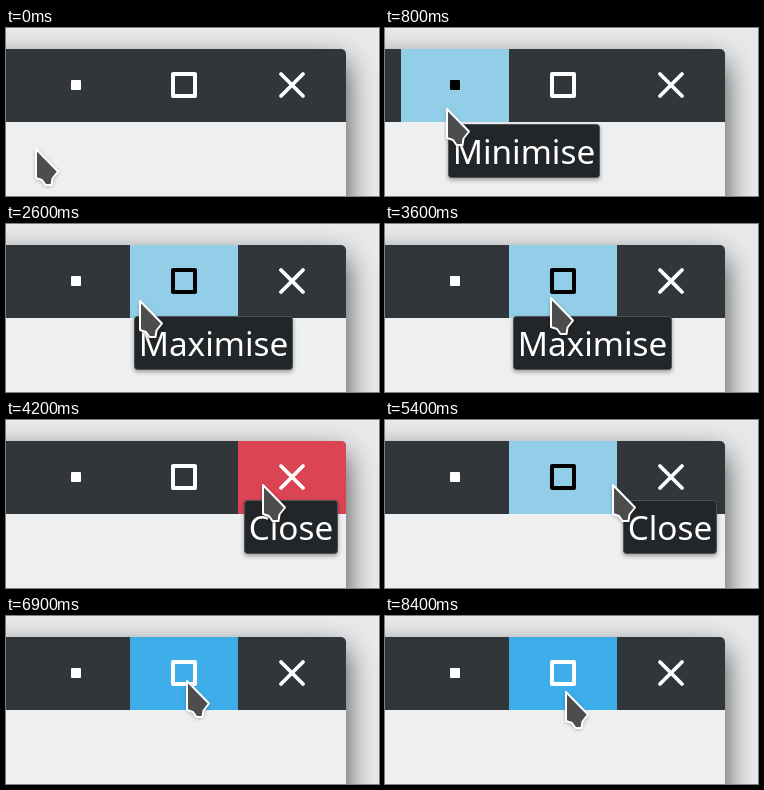
An HTML page for the animation above (8.6 s loop, 373 by 168 pixels).

```html
<!DOCTYPE html>
<html lang="en">
<head>
<meta charset="utf-8">
<title>Window buttons</title>
<style>
  html, body { margin: 0; width: 100%; height: 100%; overflow: hidden; background: #e8e9ea; }
  svg { display: block; width: 373px; height: 168px; }
  text { font: 33.33px "Noto Sans", sans-serif; fill: #fff; }
</style>
</head>
<body>
<svg viewBox="0 0 373 168">
  <defs>
    <filter id="soft" filterUnits="userSpaceOnUse" x="-160" y="-60" width="620" height="500">
      <feGaussianBlur stdDeviation="15"/>
    </filter>
    <filter id="near" x="-20%" y="-30%" width="140%" height="160%">
      <feGaussianBlur stdDeviation="2"/>
    </filter>
    <clipPath id="frame"><rect x="-40" y="21" width="380" height="300" rx="5"/></clipPath>
  </defs>
  <rect width="373" height="168" fill="#e8e9ea"/>
  <rect x="-100" y="34" width="440" height="300" rx="5" fill="#000" opacity=".72" filter="url(#soft)"/>
  <g clip-path="url(#frame)">
    <rect x="-40" y="21" width="380" height="300" fill="#eeeff0"/>
    <rect x="-40" y="21" width="380" height="73" fill="#31363b"/>
    <rect id="hover" y="21" width="108" height="73"/>
  </g>
  <rect id="min" x="65" y="52" width="10" height="10" rx="1"/>
  <rect id="max" x="167" y="46" width="22" height="22" fill="none" stroke-width="4" stroke-linejoin="round"/>
  <path d="M275 46l22 22m0-22l-22 22" stroke="#fff" stroke-width="3.8" stroke-linecap="round"/>
  <g id="tip">
    <rect id="tipShadow" y="2" height="54" rx="3" opacity=".35" filter="url(#near)"/>
    <rect id="tipBox" x=".5" y=".5" height="53" rx="3" fill="#232629" stroke="#515456"/>
    <text id="tipText" x="4.7" y="39.7"></text>
  </g>
  <g id="cursor" stroke-linejoin="round">
    <path d="M1 2V31L7 33L10.5 38H16.5L17.5 31.5L23 24.5Z" transform="translate(0 1)" opacity=".4" filter="url(#near)"/>
    <path d="M1 2V31L7 33L10.5 38H16.5L17.5 31.5L23 24.5Z" fill="#4d4d4d" stroke="#fff" stroke-width="2"/>
  </g>
</svg>
<script>
const LOOP = 8600, STEP = 100, PRESS = 6900;
const BUTTON_X = 16, BUTTON_W = 108, BAR_BOTTOM = 94;

// time, x, y of the pointer's hot spot
const path = [
  [100, 29, 119], [200, 32, 115], [500, 58, 83], [600, 61, 79],
  [1800, 61, 79], [1900, 67, 79], [2100, 88, 79], [2700, 142, 74], [3000, 160, 72],
  [3200, 165, 72], [3600, 165, 72], [4200, 256, 63],
  [5100, 256, 63], [5200, 250, 63], [5400, 227, 63], [5900, 180, 63],
  [8200, 180, 63], [8400, 180, 74]
];
const tips = [
  { from: 800, to: 2500, x: 63, y: 96, w: 152, label: "Minimise" },
  { from: 2500, to: 4100, x: 128, y: 92, w: 159, label: "Maximise" },
  { from: 4100, to: 5500, x: 238, y: 80, w: 94, label: "Close" }
];

const $ = id => document.getElementById(id);
const set = (id, attrs) => {
  for (const name in attrs) $(id).setAttribute(name, attrs[name]);
};

function pointerAt(t) {
  const i = path.findIndex(key => key[0] > t);
  if (i === 0) return path[0].slice(1);
  if (i < 0) return path[path.length - 1].slice(1);
  const [t0, x0, y0] = path[i - 1], [t1, x1, y1] = path[i];
  const k = (t - t0) / (t1 - t0);
  return [x0 + (x1 - x0) * k, y0 + (y1 - y0) * k];
}

function draw(time) {
  const t = Math.floor((time % LOOP) / STEP) * STEP;
  const [x, y] = pointerAt(t);
  const pressed = t >= PRESS;
  const button = y < BAR_BOTTOM ? Math.floor((x - BUTTON_X) / BUTTON_W) : -1;
  const ink = index => button === index && !pressed ? "#000" : "#fff";

  set("hover", {
    x: BUTTON_X + button * BUTTON_W,
    fill: button < 0 ? "none" : button === 2 ? "#da4453" : pressed ? "#3daee9" : "#93cee9"
  });
  set("min", { fill: ink(0) });
  set("max", { stroke: ink(1) });
  set("cursor", { transform: `translate(${Math.round(x)} ${Math.round(y)})` });

  const tip = tips.find(item => t >= item.from && t < item.to);
  set("tip", { visibility: tip ? "visible" : "hidden" });
  if (tip) {
    set("tip", { transform: `translate(${tip.x} ${tip.y})` });
    set("tipShadow", { width: tip.w });
    set("tipBox", { width: tip.w - 1 });
    $("tipText").textContent = tip.label;
  }
}

const start = performance.now();
function tick() {
  draw(performance.now() - start);
  requestAnimationFrame(tick);
}
draw(0);
requestAnimationFrame(tick);
</script>
</body>
</html>
```
